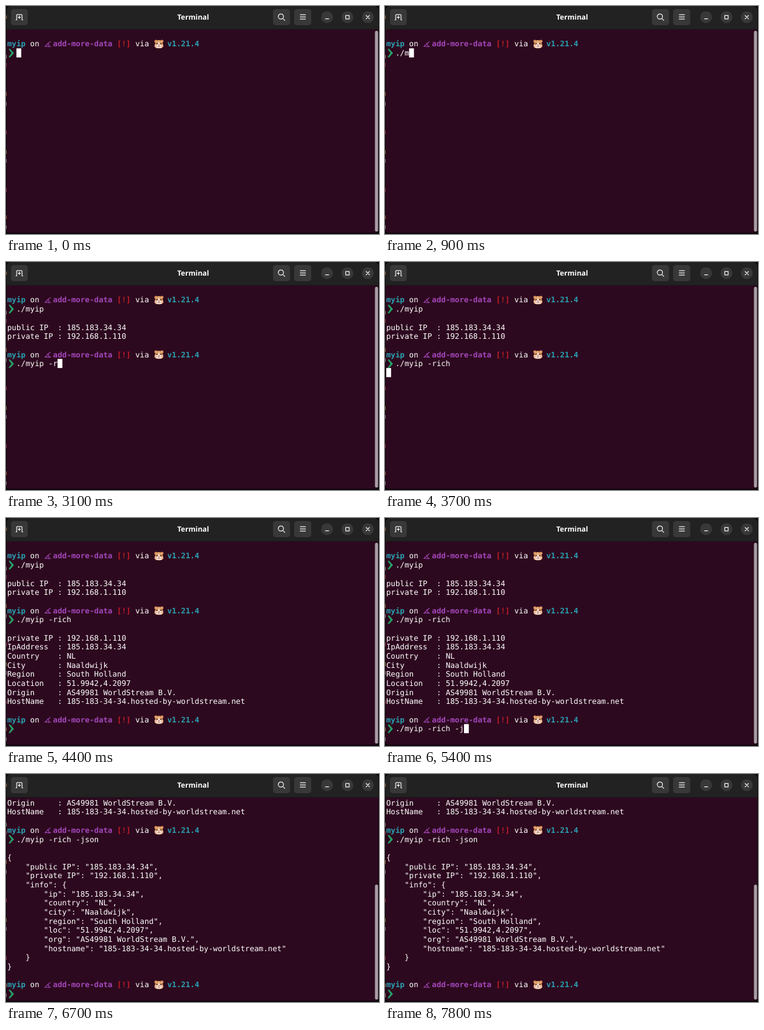
An HTML page for the animation above (8000 ms loop, 600x368 px).

```html
<!DOCTYPE html>
<html lang="en">
<head>
<meta charset="utf-8">
<title>Terminal</title>
<style>
  html, body { margin: 0; width: 100%; height: 100%; overflow: hidden; background: #0b070a; }
  svg { display: block; width: 100%; height: 100%; }
  text { white-space: pre; text-rendering: geometricPrecision; }
  .term text { font: 12.22px "DejaVu Sans Mono", monospace; fill: #fff; }
  .term .b { font-weight: bold; }
  .term .cyan { fill: #2aa1b3; }
  .term .purple { fill: #a347ba; }
  .term .red { fill: #c01c28; }
  .title { font: bold 11.6px "Noto Sans", "Open Sans", sans-serif; fill: #fff; }
  .btn { fill: #383838; }
  .icon { fill: none; stroke: #f4f4f4; stroke-width: 1.2; }
</style>
</head>
<body>
<svg viewBox="0 0 600 368" preserveAspectRatio="none">
  <defs>
    <clipPath id="screen"><rect x="1" y="38" width="592" height="328"/></clipPath>
    <g id="hamster">
      <circle cx="2.6" cy="3" r="2.5" fill="#c98045"/>
      <circle cx="12.4" cy="3" r="2.5" fill="#c98045"/>
      <circle cx="2.7" cy="3.2" r="1.3" fill="#eda39a"/>
      <circle cx="12.3" cy="3.2" r="1.3" fill="#eda39a"/>
      <path d="M7.5 1.200Q12 1.200 13 5.500 15 8.500 14.500 11.500 13 14.400 7.500 14.400T.5 11.500Q0 8.500 2 5.500 3 1.200 7.500 1.200Z" fill="#e0a065"/>
      <path d="M7.5 2.500 6.200 7 1 9.500Q1.300 14 7.500 14T14 9.500L8.800 7Z" fill="#f4dfd0"/>
      <circle cx="2.600" cy="10.600" r="1.500" fill="#efae9c"/>
      <circle cx="12.400" cy="10.600" r="1.500" fill="#efae9c"/>
      <circle cx="4.300" cy="7" r="1.100" fill="#3a2a25"/>
      <circle cx="10.700" cy="7" r="1.100" fill="#3a2a25"/>
      <ellipse cx="7.5" cy="8.800" rx="1.200" ry=".8" fill="#c9585e"/>
      <path d="M5.800 11Q7.500 12 9.200 11" fill="none" stroke="#6b4236" stroke-width=".8"/>
    </g>
  </defs>

  <g id="edge"></g>
  <path d="M1 38H599V362Q599 366 595 366H5Q1 366 1 362Z" fill="#2d091f"/>

  <path d="M1 38V8Q1 0 9 0H591Q599 0 599 8V38Z" fill="#222"/>
  <path d="M1 37.5H599" stroke="#191919"/>
  <text class="title" x="301" y="22" text-anchor="middle">Terminal</text>
  <g class="btn">
    <rect x="8" y="5" width="27" height="26" rx="4.5"/>
    <rect x="429.500" y="5" width="27.500" height="26" rx="4.5"/>
    <rect x="463.500" y="5" width="27.500" height="26" rx="4.5"/>
    <circle cx="516.500" cy="18" r="9.600"/>
    <circle cx="549.300" cy="18" r="9.600"/>
    <circle cx="582" cy="18" r="9.600"/>
  </g>
  <g class="icon">
    <path d="M15.500 22.500H17.200V14.800Q17.200 13.800 18.200 13.800H24.800Q25.800 13.800 25.800 14.800V22.500H27.500M21.500 15.800V20.800M19 18.300H24"/>
    <circle cx="442.200" cy="17" r="4.200"/>
    <path d="M445.300 20.200 448.800 23.700M472.800 14.200H482.200M472.800 17.700H482.200M472.800 21.200H482.200M513.500 20.700H519.500M546.500 15.300H552V20.800H546.500ZM579 15 585 21M585 15 579 21"/>
  </g>

  <g class="term" clip-path="url(#screen)"><g id="page"></g></g>
  <rect id="bar" x="593.500" width="5" rx="2.500" fill="#a99fa5"/>
</svg>
<script>
const LOOP = 8000, COL = 7.357, ROW = 14.68, LEFT = 2, TOP = 39;
const SCROLL_AT = 6700, SCROLL_ROWS = 16;
const page = document.getElementById('page');
const bar = document.getElementById('bar');

function add(parent, tag, attrs, text = '') {
  const el = document.createElementNS('http://www.w3.org/2000/svg', tag);
  for (const key in attrs) el.setAttribute(key, attrs[key]);
  el.textContent = text;
  return parent.appendChild(el);
}
const colX = col => LEFT + col * COL;
const rowY = row => TOP + row * ROW;
const write = (parent, row, col, text, cls = '') =>
  add(parent, 'text', { x: colX(col), y: rowY(row) + 11.8, class: cls }, text);

// Each block becomes visible at its own time.
const blocks = [];
function block(at) {
  const el = add(page, 'g', {});
  blocks.push({ at, el });
  return el;
}

function prompt(at, row) {
  const g = block(at), y = rowY(row);
  write(g, row, 0, 'myip', 'b cyan');
  write(g, row, 5, 'on');
  add(g, 'path', {
    d: 'M71.500 3.500 62.800 11.600H72.300M66.300 6.200Q69.600 8 69.200 12.800',
    transform: `translate(0 ${y})`, fill: 'none', stroke: '#a347ba', 'stroke-width': 1.1
  });
  write(g, row, 10, 'add-more-data', 'b purple');
  write(g, row, 24, '[!]', 'b red');
  write(g, row, 28, 'via');
  add(g, 'use', { href: '#hamster', x: 238.5, y: y + 0.2 });
  write(g, row, 35, 'v1.21.4', 'b cyan');
  add(g, 'path', {
    d: 'M4 1H6.800L12.800 7.700 6.800 14.400H4L8.800 7.700Z',
    transform: `translate(0 ${y + ROW})`, fill: '#26a269'
  });
}

function output(at, row, lines) {
  const g = block(at);
  lines.forEach((line, i) => write(g, row + i, 0, line));
}

const ip = '185.183.34.34', local = '192.168.1.110';
const host = '185-183-34-34.hosted-by-worldstream.net';
const info = [
  ['IpAddress', 'ip', ip],
  ['Country', 'country', 'NL'],
  ['City', 'city', 'Naaldwijk'],
  ['Region', 'region', 'South Holland'],
  ['Location', 'loc', '51.9942,4.2097'],
  ['Origin', 'org', 'AS49981 WorldStream B.V.'],
  ['HostName', 'hostname', host]
];
const pair = (name, value) => name.padEnd(10) + ' : ' + value;
const json = {
  'public IP': ip,
  'private IP': local,
  info: Object.fromEntries(info.map(([, key, value]) => [key, value]))
};

prompt(0, 1);
output(2200, 4, [pair('public IP', ip), pair('private IP', local)]);
prompt(2200, 7);
output(4400, 10, [pair('private IP', local), ...info.map(([name, , value]) => pair(name, value))]);
prompt(4400, 19);
output(6700, 22, JSON.stringify(json, null, 4).split('\n'));
prompt(6700, 36);

// Typing steps: [time, characters shown]; the cursor drops a line on enter.
const commands = [
  { row: 2, start: 0, enter: 1200, text: './myip', keys: [[500, 1], [600, 2], [900, 3], [1000, 6]] },
  { row: 8, start: 2200, enter: 3700, text: './myip -rich',
    keys: [[2600, 6], [2900, 8], [3100, 9], [3200, 10], [3300, 11], [3500, 12]] },
  { row: 20, start: 4400, enter: 6000, text: './myip -rich -json',
    keys: [[4700, 12], [5200, 14], [5400, 15], [5500, 16], [5600, 17], [5800, 18]] },
  { row: 37, start: 6700, enter: LOOP, text: '', keys: [] }
];
for (const c of commands) c.el = write(page, c.row, 2, '');
const cursor = add(page, 'rect', { width: COL + 0.4, height: ROW, fill: '#fff' });

// Blink phases that no key press cut short.
const hidden = [[1800, 2400], [4300, 4700], [6600, 7200], [7800, LOOP]];

function render(t) {
  for (const b of blocks) b.el.setAttribute('visibility', t >= b.at ? 'visible' : 'hidden');
  let row = 0, col = 0;
  for (const c of commands) {
    const typed = c.keys.reduce((n, [at, count]) => t >= at ? count : n, 0);
    c.el.textContent = c.text.slice(0, typed);
    if (t >= c.start) {
      const done = t >= c.enter;
      row = done ? c.row + 1 : c.row;
      col = done ? 0 : 2 + typed;
    }
  }
  cursor.setAttribute('x', colX(col));
  cursor.setAttribute('y', rowY(row));
  cursor.setAttribute('visibility', hidden.some(([a, b]) => t >= a && t < b) ? 'hidden' : 'visible');

  const scrolled = t >= SCROLL_AT;
  page.setAttribute('transform', `translate(0 ${scrolled ? -SCROLL_ROWS * ROW : 0})`);
  const barTop = scrolled ? 178.5 : 40;
  bar.setAttribute('y', barTop);
  bar.setAttribute('height', 364 - barTop);
}

// Slivers of the window behind, along the left edge.
const edge = document.getElementById('edge');
[18, 82, 95, 142, 158, 204, 236, 250, 297, 341, 357].forEach((y, i) =>
  add(edge, 'rect', { x: 0, y: y - 3, width: 1, height: 6, fill: ['#8a6a2c', '#7a7478', '#8a2c34'][i % 3] }));

const origin = performance.now();
function tick() {
  render((performance.now() - origin) % LOOP);
  requestAnimationFrame(tick);
}
tick();
</script>
</body>
</html>
```
